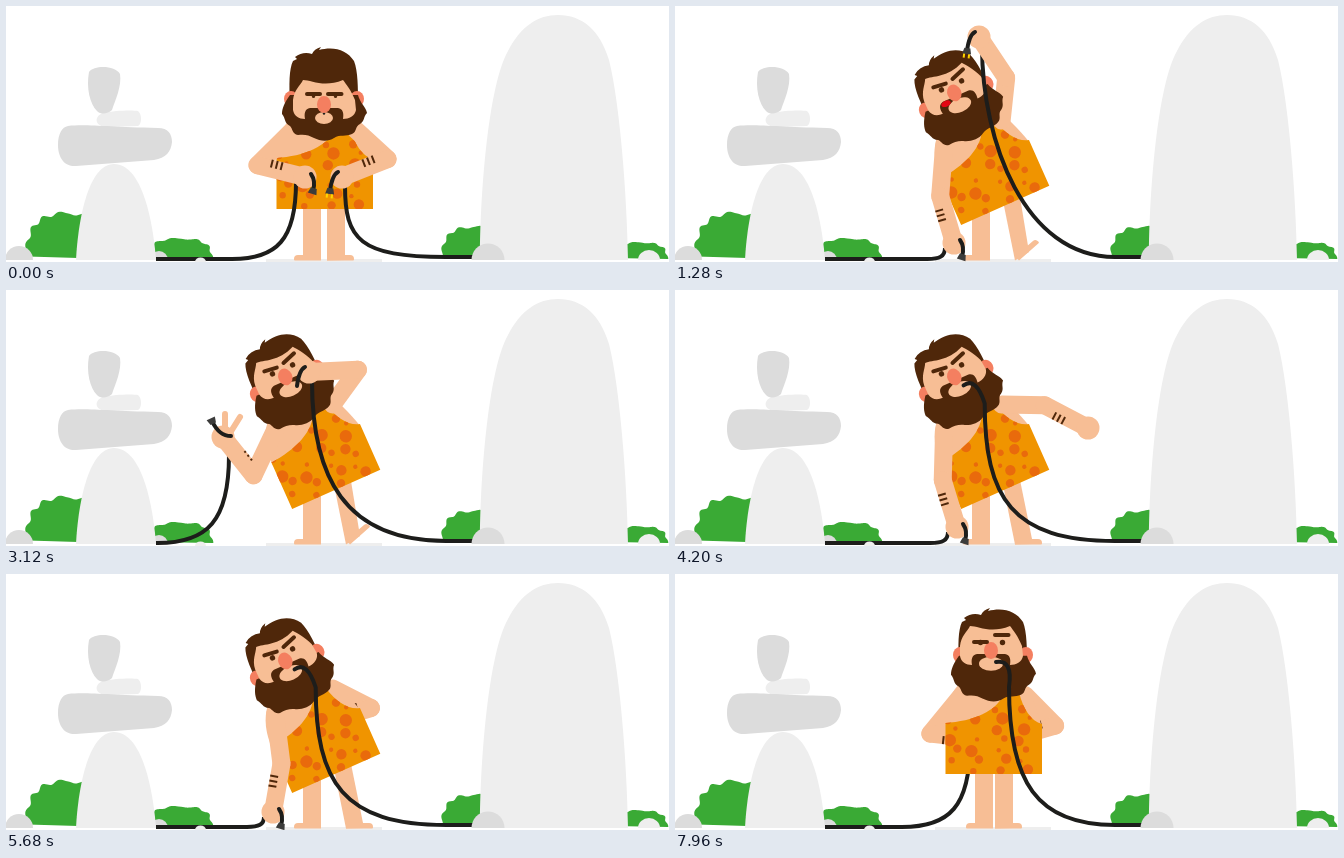
Recreate the animation shown at these times as an HTML page with a canvas. Size 663 by 256 pixels, loop 8 s.

```html
<!DOCTYPE html>
<html lang="en">
<head>
<meta charset="utf-8">
<title>Caveman with cables</title>
<style>
  html, body { margin: 0; width: 100%; height: 100%; overflow: hidden; background: #fff; }
  canvas { display: block; width: 663px; height: 256px; }
</style>
</head>
<body>
<canvas id="stage"></canvas>
<script>
const LOOP = 8000, W = 663, H = 256, GROUND = 254;
const SKIN = '#f7be95', HAIR = '#4f270a', PINK = '#f47f60', DRESS = '#f09400', SPOT = '#e96a0c',
      LIGHT = '#eeeeee', GREY = '#dcdcdc', GREEN = '#3aaa35', CABLE = '#1d1d1b', CLAMP = '#3c3c3b', YELLOW = '#ffd500';

const canvas = document.getElementById('stage');
const g = canvas.getContext('2d');
const dpr = window.devicePixelRatio || 1;
canvas.width = W * dpr;
canvas.height = H * dpr;

// ---------- drawing helpers ----------
const shape = (color, d) => { g.fillStyle = color; g.fill(new Path2D(d)); };
const oval = (color, x, y, rx, ry = rx, from = 0, to = 7) => {
  g.fillStyle = color;
  g.beginPath();
  g.ellipse(x, y, rx, ry, 0, from, to);
  g.fill();
};
const dome = (color, x, y, rx, ry = rx) => oval(color, x, y, rx, ry, Math.PI, 2 * Math.PI);
const stroke = (color, width, d, cap = 'round') => {
  g.strokeStyle = color;
  g.lineWidth = width;
  g.lineCap = cap;
  g.lineJoin = 'round';
  g.stroke(new Path2D(d));
};
const inside = (place, paint) => { g.save(); place(); paint(); g.restore(); };

// ---------- motion helpers ----------
const mix = (a, b, k) => a + (b - a) * k;
const frac = v => v % 1;
function ramp(t, from, to) {
  const k = Math.min(1, Math.max(0, (t - from) / (to - from)));
  return k * k * (3 - 2 * k);
}
const between = (t, a, b, c, d) => ramp(t, a, b) - ramp(t, c, d);

// A stop is [start, end, x, y, bulge x, bulge y]; the bulge bends the way there.
function travel(t, x, y, stops) {
  for (const [start, end, toX, toY, bulgeX = 0, bulgeY = 0] of stops) {
    const k = ramp(t, start, end), arc = Math.sin(Math.PI * k);
    x = mix(x, toX, k) + bulgeX * arc;
    y = mix(y, toY, k) + bulgeY * arc;
  }
  return [x, y];
}
const handLeft = t => travel(t, 299, 171, [
  [150, 760, 279, 237], [2440, 2960, 217, 147], [3380, 3800, 282, 237],
  [4400, 5400, 267, 238], [5960, 6480, 304, 165]]);
const handRight = t => travel(t, 336, 171, [
  [150, 760, 304, 31, 130], [1340, 1960, 303, 82], [3440, 3920, 413, 138, 70, -50],
  [4320, 4760, 318, 148], [5960, 6480, 333, 165]]);

// Two-bone arm: the elbow bends to the side that the hint points to.
function bend([sx, sy], [hx, hy], upper, fore, hintX, hintY) {
  const reach = Math.hypot(hx - sx, hy - sy), d = Math.min(reach, upper + fore);
  const ux = (hx - sx) / reach, uy = (hy - sy) / reach;
  const along = (upper ** 2 - fore ** 2 + d * d) / (2 * d);
  const out = Math.sqrt(Math.max(0, upper ** 2 - along ** 2)) * (hintY * ux - hintX * uy > 0 ? 1 : -1);
  return {
    shoulder: [sx, sy],
    elbow: [sx + ux * along - uy * out, sy + uy * along + ux * out],
    hand: [sx + ux * d, sy + uy * d]
  };
}

// ---------- scenery ----------
function bush(cx, rx, ry, lobes) {
  g.fillStyle = GREEN;
  g.beginPath();
  for (let a = 0; a <= Math.PI; a += 0.03) {
    const r = 0.97 + 0.04 * Math.cos(lobes * a), c = Math.cos(a);
    g.lineTo(cx + rx * r * Math.sign(c) * Math.abs(c) ** 0.75, 253 - ry * r * Math.sin(a) ** 0.75);
  }
  g.fill();
}
function scenery() {
  bush(62, 43, 47, 15);
  bush(174, 33, 21, 11);
  bush(468, 33, 33, 13);
  bush(634, 28, 17, 11);
  dome(GREY, 13, GROUND, 14);
  dome(GREY, 153, GROUND, 9);
  dome(LIGHT, 643, GROUND, 11, 10);
  shape(LIGHT, 'M70 254C72 215 82 158 108 158 136 158 147 215 150 254Z');
  shape(LIGHT, 'M97 107C110 104 128 104 132 105 136 108 136 118 132 120L100 121C88 120 88 110 97 107Z');
  shape(GREY, 'M62 120C80 118 100 121 152 122 162 122 166 128 166 136 165 146 160 152 148 154L70 160C56 161 52 148 52 139 52 128 56 121 62 120Z');
  shape(GREY, 'M83 66C88 59 109 59 114 68 116 80 109 95 106 104 102 108 95 109 91 105 84 98 80 82 83 66Z');
  shape(LIGHT, 'M474 254C474 190 482 80 502 45 515 20 532 9 552 9 576 9 594 24 603 54 614 98 621 190 622 254Z');
  g.fillStyle = LIGHT;
  g.fillRect(260, 253, 116, 3);
}

// ---------- character ----------
function drawLegs(lean, settle, toe) {
  const left = mix(306, 309, settle), hip = mix(330, 335, lean) - settle, ankle = mix(330, 349, lean) - settle;
  const foot = (x, turn, corners) => inside(() => { g.translate(x, 254.5); g.rotate(turn); }, () => {
    g.beginPath();
    g.roundRect(0, -5.5, 27, 5.5, corners);
    g.fill();
  });
  g.fillStyle = SKIN;
  g.fillRect(left - 9, 190, 18, 64);
  foot(left - 18, 0, [4, 0, 0, 1]);
  shape(SKIN, `M${hip - 9} 185H${hip + 9}L${ankle + 9 - 4 * toe} ${254 - 8 * toe}L${ankle - 9} 254.5Z`);
  foot(ankle - 9 + 4 * toe, -0.72 * toe, [0, 4, 1, 0]);
}

function drawTorso() {
  shape(SKIN, 'M284 110C275 120 270 135 270.5 152L366 150C362 135 355 118 350 108Z');
  const dress = new Path2D('M270.5 149C298 147 322 138 330 118H344C348 135 356 147 367 150V200H270.5Z');
  g.fillStyle = DRESS;
  g.fill(dress);
  inside(() => g.clip(dress), () => {
    for (let i = 1; i <= 26; i++)
      oval(SPOT, 271 + 96 * frac(i * 0.7549), 126 + 72 * frac(i * 0.5698), 2.2 + (i * 3 % 5));
  });
}

function drawHead(t, lean, down, doubt) {
  const chew = t > 4000 ? 0.6 * Math.sin(t / 120) : 0;
  g.translate(0, 4 * down);
  shape(HAIR, 'M284 90C283 72 283 56 287 48L291 46 289 44Q297 38 306 41 308 36 315 34L313 37C328 33 341 37 348 48 352 58 352 75 352 90Z');
  for (const x of [285, 351]) oval(PINK, x, 81 + 5 * down, 7, 8);
  inside(() => g.translate(0, chew), () =>
    shape(HAIR, 'M284 82C278 90 276 96 276 101 280 106 278 110 284 113 287 116 286 121 292 122 298 121 303 122 308 125 314 128 322 129 328 125 334 121 340 124 346 121 351 119 349 113 354 111 359 108 357 104 361 100 360 94 354 90 352 82Z'));

  g.translate(-2 * doubt, 15 * down);
  shape(SKIN, 'M287 82V72C288 62 294 58 297 52 305 52 318 60 337 52 340 56 345 62 349 72L350 82C349 88 343 91 337 91 338 85 337 81 332 80H304C299 81 298 85 299 91 293 91 288 88 287 82Z');
  oval(SKIN, 318, 90 + chew, 12 - 3 * down, 7 - down);
  if (down > 0.5) oval(CABLE, 318, 85.5, 1.2);
  if (t > 700 && t < 1800) oval('#e30613', 306, 83, 5, 3);
  oval(PINK, 318, 76.5, 7, 8.5);

  const open = Math.max(lean, doubt), eye = 1.6 + 1.1 * open;
  for (const x of [307.5, 329.5]) oval(HAIR, x, 68.5, eye);
  const left = 66 + 2 * doubt, right = 66 - 5 * doubt;
  stroke(HAIR, 4, `M301 ${left - 3 * lean}L314 ${left - 1.5 * lean}M322 ${right - 3 * lean}L335.5 ${right - 7.5 * lean}`);
}

const limb = ([ax, ay], [bx, by]) => stroke(SKIN, 18, `M${ax} ${ay}L${bx} ${by}`);

function forearm({ elbow, hand }, band, fingers = 0) {
  const [ex, ey] = elbow, [hx, hy] = hand;
  limb(elbow, hand);
  oval(SKIN, hx, hy, 11.5);
  if (fingers > 0.05)
    stroke(SKIN, 6, `M${hx + 2} ${hy}v${-23 * fingers}M${hx + 7} ${hy - 4}l${10 * fingers} ${-16 * fingers}`);
  if (Math.abs(band) < 1) return;
  inside(() => {
    g.translate(mix(ex, hx, 0.38), mix(ey, hy, 0.38));
    g.rotate(Math.atan2(hy - ey, hx - ex));
  }, () => {
    for (const x of [-5, 0, 5]) stroke(HAIR, 2, `M${x} ${-9 * Math.sign(band)}v${band}`, 'butt');
  });
}

// ---------- cables ----------
function cableTip([hx, hy], [ax, ay, cx, cy, bx, by], clamp, sparks) {
  inside(() => g.translate(hx, hy), () => {
    stroke(CABLE, 4, `M${ax} ${ay}Q${cx} ${cy} ${bx} ${by}`);
    if (!clamp) return;
    g.translate(bx, by);
    g.rotate(Math.atan2(by - cy, bx - cx));
    shape(CLAMP, 'M-3 -3L3 -4.5V4.5L-3 3Z');
    if (sparks) stroke(YELLOW, 2, 'M3 -2.5h4M3 2.5h4', 'butt');
  });
}

function leftCable([hx, hy], raised) {
  const x = hx - 9 + 15 * raised, y = hy + 5 + 13 * raised, rise = 253 - y;
  const flat = Math.max(150, x - 10 - 0.7 * rise);
  stroke(CABLE, 4, `M150 253H${flat}C${mix(flat, x, 0.7)} 253 ${x} ${y + 0.75 * rise} ${x} ${y}`, 'butt');
}

// The cable hangs steeply at first; the higher it starts, the wider it swings out.
function rightCable([x, y], hook) {
  const rise = 251 - y;
  stroke(CABLE, 4, `${hook}${x} ${y}C${x} ${y + Math.min(95, 0.75 * rise)} ${x + 0.2 * rise} 251 440 251H468`);
}

// ---------- scene ----------
function draw(t) {
  const lean = between(t, 150, 720, 5960, 6480);
  const settle = ramp(t, 5960, 6480);
  const down = 1 - ramp(t, 150, 620);
  const doubt = ramp(t, 7400, 7700);
  const raised = between(t, 2440, 2960, 3380, 3800);
  const toe = between(t, 300, 720, 3440, 3640);
  const inMouth = t >= 3450, leftBack = t > 6250, rightBack = t > 4600;

  const bodyX = mix(318.5, 330, lean), bodyY = 200 + 3 * (1 - ramp(t, 150, 720)) - 0.5 * lean;
  const angle = -24 * lean * Math.PI / 180;
  const onBody = paint => inside(() => {
    g.translate(bodyX, bodyY);
    g.rotate(angle);
    g.translate(-318.5, -200);
  }, paint);
  const joint = (x, y) => {
    const dx = x - 318.5, dy = y - 200, c = Math.cos(angle), s = Math.sin(angle);
    return [bodyX + dx * c - dy * s, bodyY + dx * s + dy * c];
  };

  const left = bend(joint(287, 121), handLeft(t), 50, 49, 0, 1);
  const right = bend(joint(350, 121), handRight(t), 43, 49, 1, 0);
  const leftBand = t < 450 ? 8 : -8 + 6 * raised;
  const rightBand = -8 * (1 - between(t, 150, 700, 3440, 3900));
  const leftFore = () => forearm(left, leftBand, raised);
  const rightFore = () => forearm(right, rightBand);

  g.setTransform(dpr, 0, 0, dpr, 0, 0);
  g.fillStyle = '#fff';
  g.fillRect(0, 0, W, H);
  scenery();
  if (leftBack) leftCable(left.hand, 0);
  drawLegs(lean, settle, toe);
  if (leftBack) { limb(left.shoulder, left.elbow); leftFore(); }
  if (rightBack) { limb(right.shoulder, right.elbow); rightFore(); }
  onBody(drawTorso);
  if (!leftBack) limb(left.shoulder, left.elbow);
  if (!rightBack) limb(right.shoulder, right.elbow);
  onBody(() => drawHead(t, lean, down, doubt));

  const [handX, handY] = right.hand;
  if (inMouth) rightCable(joint(335 - doubt, 113), `M${joint(323 - 2 * doubt, 88)}Q${joint(338, 85)} `);
  else rightCable([handX + 3, handY + 9], 'M');

  if (!leftBack) { leftCable(left.hand, raised); leftFore(); }
  if (!rightBack) rightFore();
  if (!leftBack) {
    const low = [6, -3, 11, 4, 8, 14], high = [8, -1, -4, -1, -11, -16];
    cableTip(left.hand, low.map((v, i) => mix(v, high[i], raised)), true, false);
  }
  if (!inMouth) cableTip(right.hand, [-4, -5, -10, -2, -12, 14], t < 1850, true);

  dome(GREY, 482, GROUND, 16.5);
  dome(LIGHT, 194.5, 256, 5.5, 4.5);
}

const begin = performance.now();
function tick() {
  draw((performance.now() - begin) % LOOP);
  requestAnimationFrame(tick);
}
tick();
</script>
</body>
</html>
```
